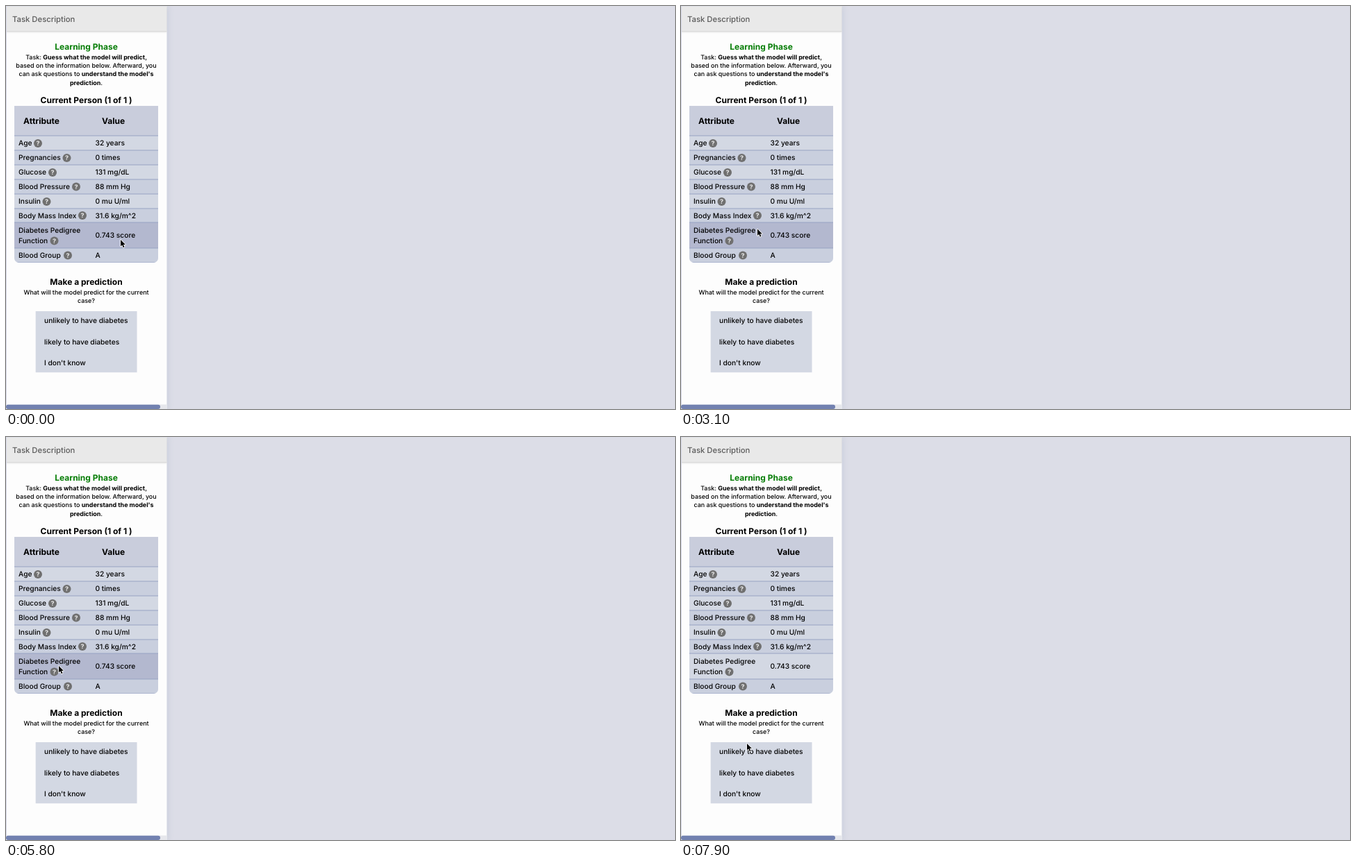
An HTML page with a canvas that plays this animation: 963 px wide and 581 px high, repeating every 8 s.

```html
<!DOCTYPE html>
<html lang="en">
<head>
<meta charset="utf-8">
<title>Task Description</title>
<style>
html, body { margin: 0; width: 100%; height: 100%; overflow: hidden; background: #dcdde7; }
canvas { display: block; }
</style>
</head>
<body>
<canvas id="stage" width="963" height="581"></canvas>
<script>
const ctx = document.getElementById('stage').getContext('2d');
const LOOP = 8000, STEP = 100;
const FAMILY = 'Inter, "Open Sans", sans-serif';
const REGULAR = 500, BOLD = 700;
const BODY = 10.22, SMALL = 8.95;
const PANEL_W = 231.5, MID = 115.5, LEFT = 12, RIGHT = 219;

const rows = [
  { label: ['Age'], value: '32 years', top: 187, bottom: 208, icon: [46, 198] },
  { label: ['Pregnancies'], value: '0 times', top: 208, bottom: 229, icon: [87.5, 219] },
  { label: ['Glucose'], value: '131 mg/dL', top: 229, bottom: 250, icon: [67, 240] },
  { label: ['Blood Pressure'], value: '88 mm Hg', top: 250, bottom: 271, icon: [101, 260.5] },
  { label: ['Insulin'], value: '0 mu U/ml', top: 271, bottom: 292, icon: [58.5, 282] },
  { label: ['Body Mass Index'], value: '31.6 kg/m^2', top: 292, bottom: 312, icon: [110, 302] },
  { label: ['Diabetes Pedigree', 'Function'], value: '0.743 score', top: 312, bottom: 349, icon: [69.5, 338.5] },
  { label: ['Blood Group'], value: 'A', top: 349, bottom: 369.5, icon: [89, 359.5] }
];

const tips = [
  { show: 600, hide: 3100, top: 317.3, lines: ['A value from weight and height that', 'indicates if weight is in a healthy range.'] },
  { show: 4200, hide: 5800, top: 357, lines: ['A score based on family history showing', 'likelihood of diabetes.'] },
  { show: 6700, hide: 7300, top: 275.3, lines: ['Diastolic blood pressure: the lower number', 'showing artery pressure when the heart is', 'resting.'] }
];

// time, x, y of the pointer
const path = [
  [0, 165, 337], [200, 157, 330], [500, 117, 306], [600, 110, 300],
  [2200, 110, 300], [3000, 109.5, 304], [3100, 110, 321.5], [3500, 95, 331],
  [4200, 73, 337], [5700, 73, 337], [5800, 76, 330], [6100, 84, 290],
  [6400, 91.5, 266.5], [6700, 101, 264], [7200, 101, 265.5], [7300, 101, 272],
  [7500, 99, 335], [7700, 97, 405], [7900, 95, 442], [8000, 95, 442]
];

function text(str, x, y, size, { weight = REGULAR, color = '#000', align = 'left' } = {}) {
  ctx.font = `${weight} ${size}px ${FAMILY}`;
  ctx.fillStyle = color;
  ctx.textAlign = align;
  ctx.fillText(str, x, y);
}

function heading(str, x, y, color) {
  text(str, x, y, 12, { weight: BOLD, color, align: 'center' });
}

// centred line; odd parts are bold
function mixedLine(parts, y) {
  const weightOf = i => i % 2 ? BOLD : REGULAR;
  const widths = parts.map((part, i) => {
    ctx.font = `${weightOf(i)} ${SMALL}px ${FAMILY}`;
    return ctx.measureText(part).width;
  });
  let x = MID - widths.reduce((a, b) => a + b, 0) / 2;
  parts.forEach((part, i) => {
    text(part, x, y, SMALL, { weight: weightOf(i) });
    x += widths[i];
  });
}

function box(x, y, w, h, color, radius = 0) {
  ctx.fillStyle = color;
  ctx.beginPath();
  ctx.roundRect(x, y, w, h, radius);
  ctx.fill();
}

function drawPanel() {
  box(0, 0, 963, 581, '#dcdde7');
  ctx.save();
  ctx.shadowColor = 'rgba(120, 140, 170, 0.22)';
  ctx.shadowBlur = 9;
  box(0, 0, PANEL_W, 581, '#fdfdfd');
  ctx.restore();
  ctx.save();
  ctx.beginPath();
  ctx.rect(0, 0, PANEL_W, 581);
  ctx.clip();
  ctx.shadowColor = 'rgba(0, 0, 0, 0.2)';
  ctx.shadowBlur = 3;
  box(0, 0, PANEL_W, 37, '#e9e9e9');
  ctx.restore();
  box(0, 36, PANEL_W, 1, '#dadada');
  box(0, 0, PANEL_W, 1, '#dfe0e6');
  box(0, 0, 1, 581, '#d7d9e8');
  box(0, 574.5, PANEL_W, 6.5, '#e6e7ec');
  box(0, 574.8, 222, 6.2, '#7281b0', 3);

  text('Task Description', 9, 22.8, 11.3, { color: '#5b5b5b' });
  heading('Learning Phase', MID, 63.2, '#067d06');
  mixedLine(['Task: ', 'Guess what the model will predict', ','], 77);
  mixedLine(['based on the information below. Afterward, you'], 89.2);
  mixedLine(['can ask questions to ', "understand the model's"], 101.4);
  mixedLine(['', 'prediction', '.'], 113.6);

  heading('Make a prediction', MID, 401.9);
  mixedLine(['What will the model predict for the current'], 415.6);
  mixedLine(['case?'], 427.8);
  box(42.7, 440, 145.8, 88.3, '#d3d8e3');
  ['unlikely to have diabetes', 'likely to have diabetes', "I don't know"].forEach((answer, i) =>
    text(answer, 55, 457.4 + i * 30.5, BODY));
}

function drawIcon([x, y]) {
  ctx.fillStyle = '#707070';
  ctx.beginPath();
  ctx.arc(x, y, 6, 0, Math.PI * 2);
  ctx.fill();
  text('?', x, y + 3.2, 9, { weight: BOLD, color: '#eee', align: 'center' });
}

function drawTable(pointerY) {
  const width = RIGHT - LEFT;
  heading('Current Person (1 of 1 )', MID, 139.5);
  ctx.save();
  ctx.beginPath();
  ctx.roundRect(LEFT, 144, width, 225.8, [0, 0, 6, 6]);
  ctx.clip();
  box(LEFT, 144, width, 43, '#c9cddc');
  rows.forEach((row, i) => {
    const hover = pointerY >= row.top && pointerY < row.bottom;
    const color = hover ? '#b3b8cf' : i % 2 ? '#c9cfde' : '#d3d8e3';
    box(LEFT, row.top, width, row.bottom - row.top, color);
  });
  rows.forEach(row => box(LEFT, row.top - 0.5, width, 1, '#98a4c4'));
  box(LEFT, 369, width, 1, '#98a4c4');
  ctx.restore();

  heading('Attribute', 51, 170);
  heading('Value', 154.5, 170);
  rows.forEach(row => {
    const base = (row.top + row.bottom) / 2 + 3.9;
    const first = base - (row.label.length - 1) * 7.7;
    row.label.forEach((line, i) => text(line, 18, first + i * 15.3, BODY));
    text(row.value, 128.5, base, BODY);
    drawIcon(row.icon);
  });
}

function drawTip(tip, t) {
  const left = 1 - Math.min(1, (t - tip.show) / 300);
  ctx.save();
  ctx.globalAlpha = 1 - left ** 3;
  ctx.beginPath();
  ctx.rect(0, 0, PANEL_W, 581);
  ctx.clip();
  ctx.fillStyle = '#4a4a4a';
  ctx.beginPath();
  ctx.moveTo(122.5, tip.top);
  ctx.lineTo(126.5, tip.top - 4.5);
  ctx.lineTo(130.5, tip.top);
  ctx.fill();
  box(LEFT, tip.top, 240, 15.2 + tip.lines.length * 15.25, '#4a4a4a', 5);
  tip.lines.forEach((line, i) =>
    text(line, 20, tip.top + 18.8 + i * 15.3, BODY, { color: '#fff' }));
  ctx.restore();
}

function pointerAt(t) {
  const i = path.findIndex(key => key[0] > t);
  const [t0, x0, y0] = path[i - 1], [t1, x1, y1] = path[i];
  const p = (t - t0) / (t1 - t0);
  return [x0 + (x1 - x0) * p, y0 + (y1 - y0) * p];
}

function drawPointer(x, y, help) {
  ctx.save();
  ctx.translate(x, y);
  ctx.lineJoin = 'round';
  ctx.strokeStyle = '#fff';
  ctx.lineWidth = 1.6;
  if (help) {
    ctx.font = `${BOLD} 11.5px ${FAMILY}`;
    ctx.textAlign = 'center';
    ctx.strokeText('?', 0, 4.3);
    text('?', 0, 4.3, 11.5, { weight: BOLD, align: 'center' });
  } else {
    ctx.fillStyle = '#000';
    ctx.beginPath();
    [[0, 0], [0, 9.6], [2.2, 7.6], [3.8, 11.2], [5.4, 10.5], [3.9, 7], [6.9, 7]]
      .forEach(([px, py]) => ctx.lineTo(px, py));
    ctx.closePath();
    ctx.stroke();
    ctx.fill();
  }
  ctx.restore();
}

function draw(now) {
  const t = Math.floor((now % LOOP) / STEP) * STEP;
  const [x, y] = pointerAt(t);
  const tip = tips.find(({ show, hide }) => t >= show && t < hide);
  ctx.textRendering = 'geometricPrecision';
  drawPanel();
  drawTable(y);
  if (tip) drawTip(tip, t);
  drawPointer(x, y, Boolean(tip));
}

let start;
function loop(now) {
  start ??= now;
  draw(Math.max(0, now - start));
  requestAnimationFrame(loop);
}
draw(0);
requestAnimationFrame(loop);
</script>
</body>
</html>
```
